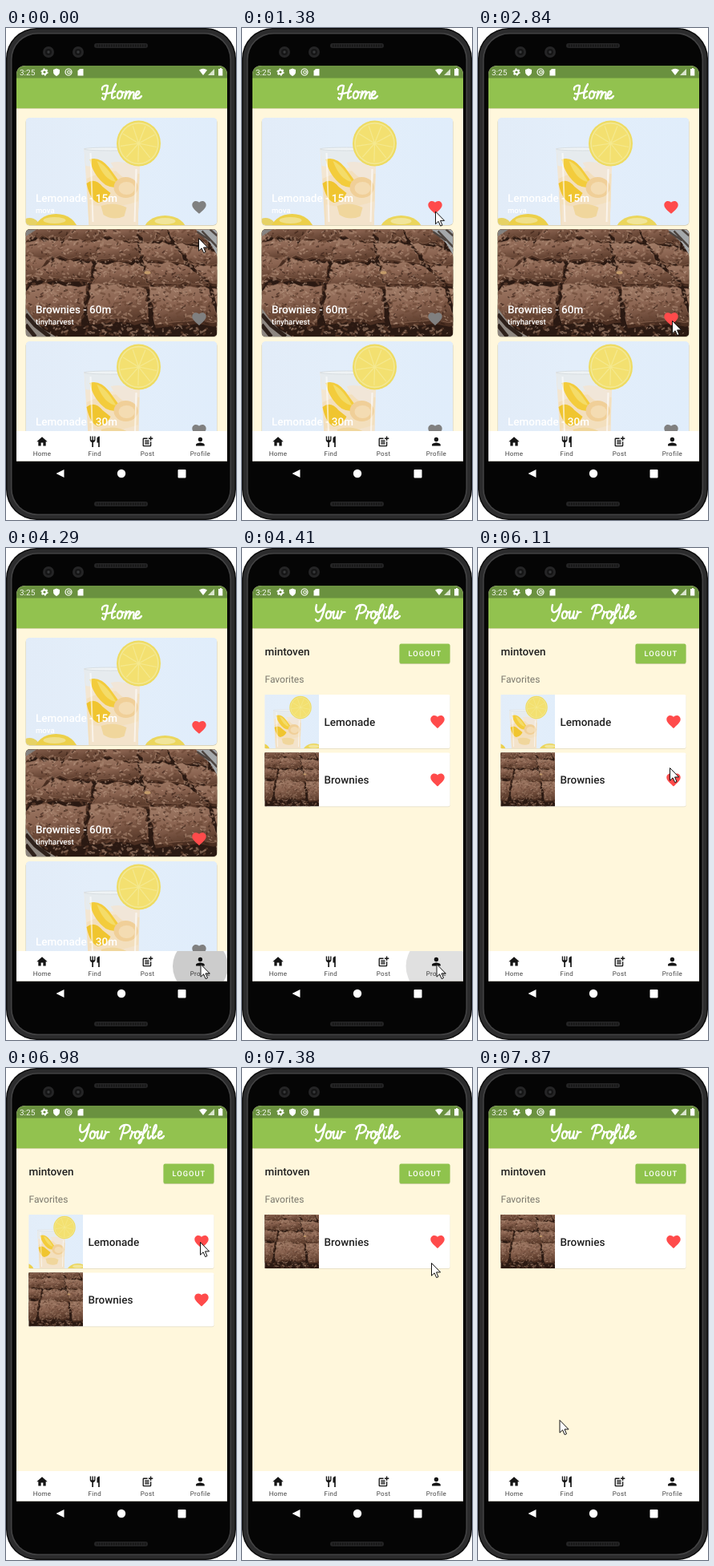
An HTML page for the animation above (8 s loop, 287 px wide and 614 px high).

```html
<!DOCTYPE html>
<html lang="en">
<head>
<meta charset="utf-8">
<title>Recipe app</title>
<style>
html, body { margin: 0; width: 100%; height: 100%; overflow: hidden; background: #fff; }
svg { display: block; }
#stage { width: 100vw; height: 100vh; }
text { font-family: Roboto, sans-serif; text-rendering: geometricPrecision; }
.title { font-size: 13.5px; font-weight: 500; }
.author { font-size: 9.6px; font-weight: 500; }
.tab { font-size: 8px; letter-spacing: .3px; text-anchor: middle; fill: #444; }
.script { fill: none; stroke: #fff; stroke-width: 2.3; stroke-linecap: round; stroke-linejoin: round; }
</style>
</head>
<body>
<svg id="stage" viewBox="0 0 287 614"></svg>
<script>
const LOOP = 8000;
const LIKE_FIRST = 1380, LIKE_SECOND = 2840, OPEN_PROFILE = 4410, UNLIKE = 7260;
const GREY = '#808080', RED = '#ff4b4b';

// [time, x, y]: the pointer holds each place until the next row
const pointerSteps = [
  [0, 240, 262], [500, 239, 259], [620, 237, 252], [740, 236, 243], [870, 238, 235], [990, 240, 230],
  [1140, 241, 228.5], [1670, 243, 246], [1790, 244, 296], [1910, 243, 345], [2030, 242, 363],
  [2840, 242, 365], [3240, 242, 410], [3380, 244, 463], [3500, 243, 508], [3650, 243, 518], [3800, 242.5, 519],
  [5120, 229, 455], [5240, 168, 275], [5360, 131.5, 160],
  [5510, 82, 183], [5630, 38, 232], [5750, 50, 300], [5870, 112, 336], [5990, 190, 322], [6110, 239, 274], [6230, 251, 237],
  [6380, 250, 233], [6500, 248, 229], [6620, 246, 225], [6740, 244, 221], [6860, 243, 218], [6980, 242, 217],
  [7380, 236, 243], [7500, 208, 305], [7620, 171, 357], [7870, 101.5, 439]
];
// [time, radius, opacity]
const rippleSteps = [[0, 0, 0], [4170, 20, .14], [4290, 34.5, .2], [4410, 38, .12], [4560, 0, 0]];

let seed = 11;
const random = () => (seed = (seed * 16807) % 2147483647) / 2147483647;
const jitter = size => (random() - .5) * 2 * size;

const icons = {
  heart: 'M12 21.35l-1.45-1.32C5.4 15.36 2 12.28 2 8.5 2 5.42 4.42 3 7.5 3c1.74 0 3.41.81 4.5 2.09C13.09 3.81 14.76 3 16.5 3 19.58 3 22 5.42 22 8.5c0 3.78-3.4 6.86-8.55 11.54z',
  Home: 'M10 20v-6h4v6h5v-8h3L12 3 2 12h3v8z',
  Find: 'M11 9H9V2H7v7H5V2H3v7c0 2.1 1.7 3.8 3.75 4v9h2.5v-9C11.3 12.8 13 11.1 13 9V2h-2zM16 6v8h2.5v8H21V2c-2.8 0-5 2.2-5 4z',
  Post: 'M17 19H5V7h7V5H5c-1.1 0-2 .9-2 2v12c0 1.1.9 2 2 2h12c1.1 0 2-.9 2-2v-7h-2zM19 2h-2v3h-3v2h3v3h2V7h3V5h-3zM7 9h8v2H7zM7 12h8v2H7zM7 15h8v2H7z',
  Profile: 'M12 12a4 4 0 1 0 0-8 4 4 0 0 0 0 8zm0 2c-2.67 0-8 1.34-8 4v2h16v-2c0-2.66-5.33-4-8-4z'
};
const icon = (name, x, y, scale, attrs = '') =>
  `<path d="${icons[name]}" transform="translate(${x} ${y}) scale(${scale}) translate(-12 -12.1)" ${attrs}/>`;
const heart = (x, y, id, fill) => icon('heart', x, y, .87, `id="${id}" fill="${fill}"`);
const rect = (x, y, w, h, fill, attrs = '') =>
  `<rect x="${x}" y="${y}" width="${w}" height="${h}" fill="${fill}" ${attrs}/>`;
const circle = (x, y, r, fill, attrs = '') => `<circle cx="${x}" cy="${y}" r="${r}" fill="${fill}" ${attrs}/>`;
const ellipse = (x, y, rx, ry, fill, attrs = '') =>
  `<ellipse cx="${x}" cy="${y}" rx="${rx}" ry="${ry}" fill="${fill}" ${attrs}/>`;
const shape = (d, fill, attrs = '') => `<path d="${d}" fill="${fill}" ${attrs}/>`;
const label = (x, y, text, cls, attrs = '') => `<text x="${x}" y="${y}" class="${cls}" ${attrs}>${text}</text>`;
const picture = (name, x, y, w, h) => `<use href="#${name}" x="${x}" y="${y}" width="${w}" height="${h}"/>`;

function lemonSlice(x, y, r) {
  let spokes = '';
  for (let i = 0; i < 9; i++) {
    const a = i * Math.PI * 2 / 9 + .2;
    spokes += `M${x} ${y}l${Math.cos(a) * r * .8} ${Math.sin(a) * r * .8}`;
  }
  return ellipse(x, y, r - 1, r, '#eedb62') + ellipse(x, y, r * .89, r * .92, '#f3e893') +
    ellipse(x, y, r * .83, r * .86, '#f3e070') + shape(spokes, 'none', 'stroke="#f5e98f" stroke-width="1.2"');
}

function lemonade() {
  return rect(0, 0, 239, 134, 'url(#sky)') +
    shape('M73 38L79 134H140L143 50V38Z', '#f3e6d2') +
    shape('M73 38L75 60Q108 66 142 58V38Z', '#e6ebee') +
    shape('M76 76L79 134H140L142 70Q108 60 76 76Z', '#f3dfbd') +
    shape('M106 56Q128 52 140 66L139 82Q116 76 106 56Z', '#f1e6d8') +
    shape('M80 52Q92 48 104 62L120 84Q112 90 100 84 84 72 80 52Z', '#f3cc3c') +
    shape('M89 54Q100 58 113 80 98 78 89 54Z', '#f4dc69') +
    shape('M76 82Q86 74 96 86L106 94Q102 104 90 106 80 102 76 82Z', '#f0c52f') +
    ellipse(125, 87, 15, 13, '#f0cf98') + ellipse(126, 88, 10, 8, '#f4dcb2') +
    shape('M80 108Q108 116 141 104L140 134H80Z', '#f3e3cb') +
    shape('M94 110q16-6 32 2l-3 11q-14 6-26-2z', '#f0d69c') +
    shape('M81 44L84 130M138 64L136 130', 'none', 'stroke="#fff" stroke-width="2" opacity=".6"') +
    ellipse(106, 39, 33, 2, '#eff3f5', 'stroke="#d3dade" stroke-width=".8"') +
    lemonSlice(141, 32, 28.5) +
    ellipse(5, 138, 13, 13, '#e6d265') +
    ellipse(38, 141, 27, 21, '#ecd04a') + ellipse(36, 128, 14, 4, '#f0e08c') +
    ellipse(174, 142, 27, 20, '#ebd65c') + ellipse(174, 129, 13, 4, '#f1e59a');
}

function brownies() {
  const rows = [-12, 16, 42, 72, 120], widths = [36, 45, 58, 76, 86];
  const corner = (c, r) => [122 + (c + .45) * widths[r] + jitter(4), rows[r] + jitter(4) + c * 2];
  const edge = (a, b) => {
    let d = '';
    for (let i = 0; i < 8; i++)
      d += `L${a[0] + (b[0] - a[0]) * i / 8 + jitter(2.4)} ${a[1] + (b[1] - a[1]) * i / 8 + jitter(2.4)}`;
    return d;
  };
  let art = rect(0, 0, 239, 134, '#2a1912');
  for (let r = 0; r < 4; r++) for (let c = -5; c < 4; c++) {
    const gap = 2 + r;
    const p = [corner(c, r), corner(c + 1, r), corner(c + 1, r + 1), corner(c, r + 1)];
    p[1][0] -= gap; p[2][0] -= gap; p[2][1] -= gap; p[3][1] -= gap;
    const outline = p.map((q, i) => edge(q, p[(i + 1) % 4])).join('').replace('L', 'M') + 'Z';
    art += shape(outline, '#4a2e21', `transform="translate(1 ${gap})"`);
    art += shape(outline, 'url(#crust)', 'stroke="#8d6853" stroke-width=".7" stroke-linejoin="round"');
  }
  // [color, count, length, width]
  for (const [color, count, size, width] of [
    ['#6a4634', 340, 5, 2.6], ['#a98570', 380, 5, 2.2], ['#311c13', 260, 4, 1.5], ['#c5a590', 330, 3, 1.1], ['#3f271b', 300, 2, 1]]) {
    let crumbs = '';
    for (let i = 0; i < count; i++)
      crumbs += `M${(random() * 239).toFixed(1)} ${(random() * 134).toFixed(1)}l${jitter(size).toFixed(1)} ${jitter(size * .6).toFixed(1)}`;
    art += shape(crumbs, 'none', `stroke="${color}" stroke-width="${width}" stroke-linecap="round" opacity=".6"`);
  }
  return art +
    shape('M0 0H14L6 5 0 9Z', '#858381') +
    shape('M212 0H239V32L230 17 220 8Z', '#a4a8aa') + shape('M220 2L239 22M214 3l16 11M230 0l9 8', 'none', 'stroke="#4d4540" stroke-width="2.5"') +
    shape('M0 98L10 112 22 125 38 134H0Z', '#8d8680') + shape('M0 106l12 14 18 14M0 119l12 15', 'none', 'stroke="#2e211b" stroke-width="5"') +
    ellipse(152, 54, 4, 2, '#c29a6a');
}

function recipeCard(y, name, title, author, id) {
  return rect(24.5, y + .8, 239, 134, '#cfc8b0', 'rx="5"') +
    `<g clip-path="url(#cards)">${picture(name, 24.5, y, 239, 134)}</g>` +
    label(37, y + 105, title, 'title', 'fill="#fff"') +
    label(37, y + 119, author, 'author', 'fill="#fff"') +
    heart(241, y + 111.8, id, GREY);
}

function favorite(id, y, name, title) {
  return `<g id="${id}">` + rect(28.5, y + .8, 231, 67, '#e2dbc2', 'rx="2"') + rect(28.5, y, 231, 67, '#fff', 'rx="2"') +
    picture(name, 28.5, y, 67.5, 67) +
    label(102.5, y + 38.5, title, 'title', 'fill="#212121"') + heart(244, y + 34, id + 'Heart', RED) + '</g>';
}

const lettering = (name, strokes) => `<path class="script" role="img" aria-label="${name}" d="${strokes}"/>`;
const letterO = x => `M${x} 79c-4-1-6 9-2 9s6-9 2-9q1 3 4 1`;
const letterE = x => `M${x} 84c4 0 6-5 3-5s-5 9-1 9q3 0 5-3`;
const letterR = x => `M${x} 79q1 2 0 3l-2 6c1-5 3-9 6.5-8`;

const homeTitle = lettering('Home',
  'M120 77c-1-4 4-6 7-5-1 6-2 12-4 17q-2 1-3-2M137 70c-4 6-5 13-5 17q1 2 4-1M121 82c5 1 9-1 15-3' + letterO(143) +
  'M150 79l-2 9c2-6 4-9 6-9s0 5-1 9c2-6 4-9 6-8s-1 7 0 8 2 0 3-2' + letterE(162));
const profileTitle = lettering('Your Profile',
  'M93 71c-2 7 0 10 3 9s6-5 8-10c-2 9-4 18-8 21q-3 1-4-2' + letterO(109) +
  'M115 79c-1 4-2 9 0 9s4-4 5-9c-1 5-2 9 0 9s2-2 3-3' + letterR(124) +
  'M148 72l-5 17M142 76c2-6 13-7 13-1 0 5-6 7-9 6' + letterR(157) + letterO(165) +
  'M169 83c5-2 9-9 7-12s-4 6-5 12-3 12-5 11 2-5 6-7M178 79c-1 4-2 9 0 9s2-1 3-3M180 74v.1M183 83c4-4 6-12 4-12s-4 9-4 14 2 3 4 0' + letterE(190));

function phone() {
  const speaker = y => rect(110, y, 67, 6, '#242425', 'rx="3"') +
    `<path d="M113 ${y + 3}H175" stroke="#151515" stroke-width="3" stroke-dasharray="1.5 1.5"/>`;
  const lens = x => circle(x, 30, 7, '#252526') + circle(x, 30, 4, '#161617') + circle(x, 30, 1.7, '#38393b');
  return rect(0, 0, 287, 614, '#0c0c0c', 'rx="38"') + rect(1.5, 1.5, 284, 611, '#2c2c2d', 'rx="37"') +
    rect(6, 6, 275, 602, '#434344', 'rx="33"') + rect(7.5, 7.5, 272, 599, '#050505', 'rx="32"') +
    speaker(19) + speaker(591) + lens(53) + lens(90);
}

function statusBar() {
  return rect(13, 47, 263, 15.5, '#6a913f') + label(17, 58.5, '3:25', '', 'font-size="10" fill="#f4f7ef"') +
    circle(48, 55, 2.6, 'none', 'stroke="#fff" stroke-width="2"') +
    circle(48, 55, 4, 'none', 'stroke="#fff" stroke-width="1.3" stroke-dasharray="2 2.19"') +
    shape('M63 50.5l4 1.5v3q0 3-4 5-4-2-4-5v-3z', '#fff') +
    circle(78, 55, 4, 'none', 'stroke="#fff" stroke-width="1.2"') + circle(78.5, 55, 1.8, 'none', 'stroke="#fff" stroke-width="1.1"') +
    shape('M92 51h4.5v8.5h-7v-6z', '#fff') +
    shape('M241 52.5q5-3.6 10 0l-5 6.5z', '#fff') + shape('M260 51v8h-8z', '#d9e5cc') +
    shape('M266 51h1v-1h2v1h1.3v8.5H265V51z', '#fff');
}

function bottomTabs() {
  const tabs = ['Home', 'Find', 'Post', 'Profile'].map((name, i) => {
    const x = 45 + i * 65.8;
    return icon(name, x, 516.3, .67, 'fill="#151515"') + label(x, 533.5, name, 'tab');
  });
  return rect(13, 503, 263, 38, '#fff') + tabs.join('') +
    '<g clip-path="url(#tabs)"><circle id="ripple" cx="242.5" cy="522"/></g>';
}

const homePage = '<g id="home">' + homeTitle +
  recipeCard(112, 'lemonade', 'Lemonade - 15m', 'mova', 'first') +
  recipeCard(251.3, 'brownies', 'Brownies - 60m', 'tinyharvest', 'second') +
  recipeCard(391, 'lemonade', 'Lemonade - 30m', 'mova', 'third') + '</g>';

const profilePage = '<g id="profile">' + profileTitle +
  label(28.5, 134, 'mintoven', 'title', 'fill="#212121"') +
  rect(196.5, 120.5, 63, 24.5, '#c9cda0', 'rx="2"') + rect(196.5, 119.5, 63, 24.5, '#8fc34d', 'rx="2"') +
  label(228.4, 135.3, 'LOGOUT', '', 'font-size="9.3" font-weight="500" letter-spacing="1" text-anchor="middle" fill="#fff"') +
  label(28.5, 167.5, 'Favorites', '', 'font-size="12" fill="#7a776c"') +
  favorite('lemonadeRow', 183, 'lemonade', 'Lemonade') + favorite('browniesRow', 255.5, 'brownies', 'Brownies') + '</g>';

const symbol = (id, art) => `<symbol id="${id}" viewBox="0 0 239 134" preserveAspectRatio="xMidYMid slice">${art}</symbol>`;
const stage = document.getElementById('stage');
stage.innerHTML = `<defs>
  <linearGradient id="sky"><stop stop-color="#e2ecf8"/><stop offset=".4" stop-color="#e3eefa"/><stop offset="1" stop-color="#e0edfb"/></linearGradient>
  <linearGradient id="crust" x2=".3" y2="1"><stop stop-color="#a37f6a"/><stop offset=".55" stop-color="#8a6350"/><stop offset="1" stop-color="#5f3f2f"/></linearGradient>
  <clipPath id="screen"><path d="M13 540.6V59q0-12 12-12H264q12 0 12 12V540.6z"/></clipPath>
  <clipPath id="tabs"><rect x="13" y="503" width="263" height="38"/></clipPath>
  <clipPath id="cards">${[112, 251.3, 391].map(y => rect(24.5, y, 239, 134, '#000', 'rx="5"')).join('')}</clipPath>
  ${symbol('lemonade', lemonade())}${symbol('brownies', brownies())}
  </defs>` + phone() +
  '<g clip-path="url(#screen)">' + rect(13, 47, 263, 494, '#fff7dc') + rect(13, 62, 263, 38, '#92c24f') + rect(13, 100, 263, 1, '#d3d3a6') +
  statusBar() + homePage + profilePage + bottomTabs() + '</g>' +
  shape('M72.5 551v10L62.5 556z', '#fff') + circle(144, 556, 5.2, '#fff') + rect(214.5, 551, 10, 10.5, '#fff', 'rx="1"') +
  '<path id="pointer" d="M.5.5V16.2L4.1 12.8 6.7 18.6 9 17.6 6.5 11.9H11.6Z" fill="#fff" stroke="#111" stroke-width="1"/>';

const part = id => document.getElementById(id);
const show = (id, on) => part(id).setAttribute('display', on ? 'inline' : 'none');
const held = (steps, t) => steps.findLast(step => step[0] <= t);

function render(t) {
  const [, x, y] = held(pointerSteps, t);
  part('pointer').setAttribute('transform', `translate(${x} ${y})`);
  const [, radius, opacity] = held(rippleSteps, t);
  part('ripple').setAttribute('r', radius);
  part('ripple').setAttribute('opacity', opacity);
  part('first').setAttribute('fill', t >= LIKE_FIRST ? RED : GREY);
  part('second').setAttribute('fill', t >= LIKE_SECOND ? RED : GREY);
  show('home', t < OPEN_PROFILE);
  show('profile', t >= OPEN_PROFILE);
  show('lemonadeRow', t < UNLIKE);
  part('browniesRow').setAttribute('transform', `translate(0 ${t < UNLIKE ? 0 : -72.5})`);
}

const start = performance.now();
function tick() {
  render((performance.now() - start) % LOOP);
  requestAnimationFrame(tick);
}
tick();
</script>
</body>
</html>
```
